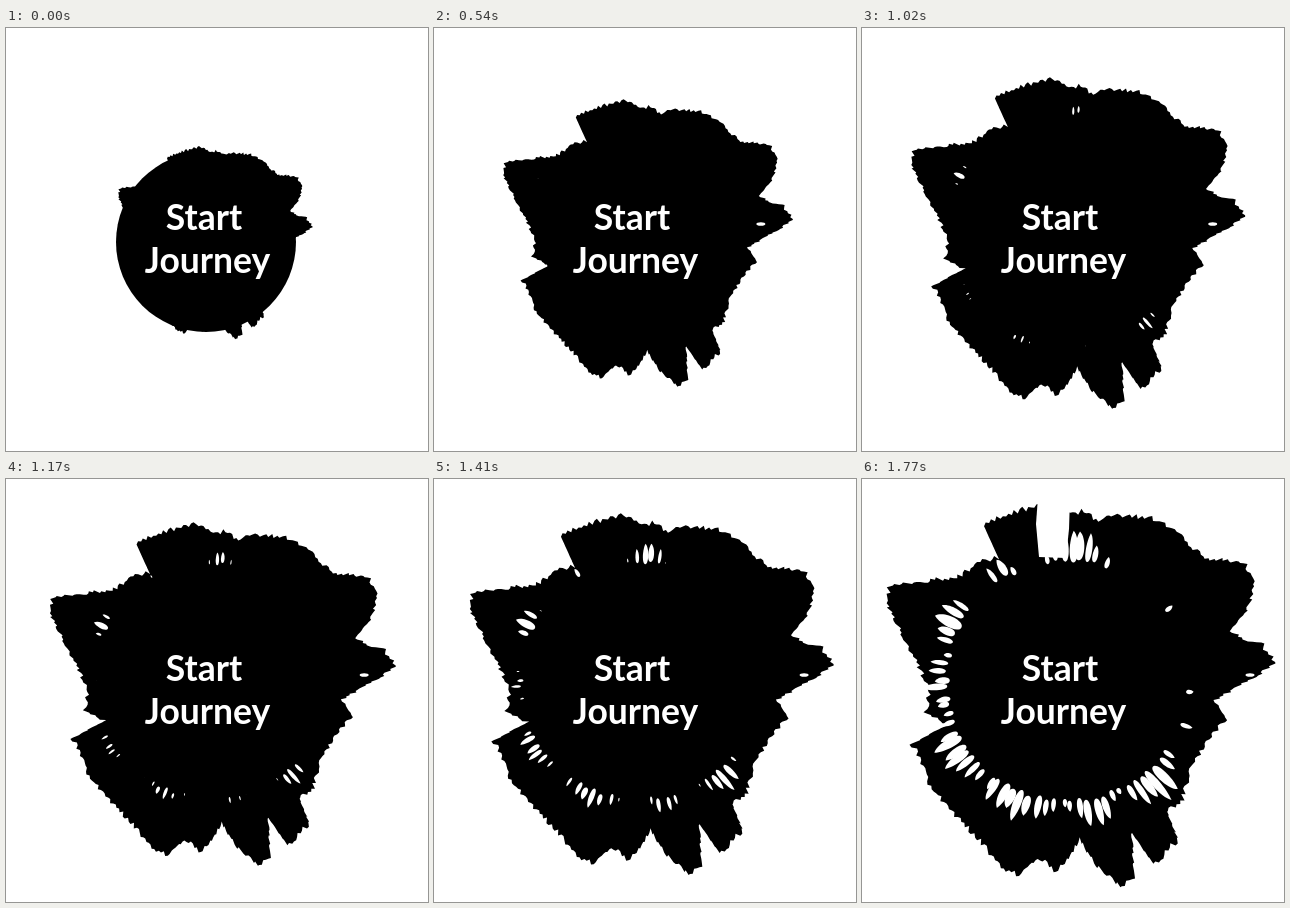
Write an HTML page with a canvas that moves like this. It is 422x423 px and loops after 1800 ms.

```html
<!DOCTYPE html>
<html lang="en">
<head>
<meta charset="utf-8">
<title>Start Journey</title>
<style>
html, body { margin: 0; width: 100%; height: 100%; overflow: hidden; background: #fff; }
canvas, svg { position: absolute; left: 0; top: 0; display: block; }
text { font: bold 35.5px Lato, "Open Sans", sans-serif; fill: #fff; text-anchor: middle; }
</style>
</head>
<body>
<canvas id="ink" width="422" height="423"></canvas>
<svg width="422" height="423">
  <text x="198" y="202">Start</text>
  <text x="201.5" y="245">Journey</text>
</svg>
<script>
const ctx = document.getElementById('ink').getContext('2d');
const LOOP = 1800, STEP = 30, END = 1770, TAU = Math.PI * 2;
const CX = 200, CY = 214;

// Tips and notches of the full-grown blot, clockwise from the top
const lobes = [
  [208, 35], [222, 32], [236, 44], [252, 35], [292, 40], [318, 53], [340, 79], [383, 83],
  [393, 102], [386, 130], [366, 153], [385, 161], [400, 165], [413, 183], [398, 195],
  [353, 221], [366, 239], [350, 255], [328, 290], [320, 323], [304, 330], [316, 360],
  [292, 386], [270, 354], [272, 397], [260, 408], [235, 388], [218, 361], [205, 382],
  [194, 393], [176, 378], [157, 397], [137, 386], [112, 355], [70, 310], [50, 265],
  [86, 245], [64, 233], [68, 213], [56, 186], [24, 124], [28, 107], [100, 97],
  [115, 83], [136, 78], [121, 45], [158, 31], [189, 24]
];

// Where the ink tears open: angle in degrees, spread, strength
const weak = [
  [3, 3, 0.12], [21, 3, 0.12], [49, 10, 0.95], [78, 9, 0.65], [113, 13, 0.85],
  [147, 13, 0.75], [177, 11, 0.5], [208, 7, 1], [240, 4, 0.5], [274, 10, 0.8], [325, 3, 0.12]
];

const clamp = v => Math.max(0, Math.min(1, v));
const mix = (a, b, p) => a + (b - a) * p;
const rand = n => {
  const v = Math.sin(n * 127.1 + 11.7) * 43758.5453;
  return v - Math.floor(v);
};

function buildRim() {
  const rim = [];
  lobes.forEach(([x0, y0], i) => {
    const [x1, y1] = lobes[(i + 1) % lobes.length];
    const cuts = Math.max(1, Math.round(Math.hypot(x1 - x0, y1 - y0) / 3));
    for (let k = 0; k < cuts; k++) {
      const x = mix(x0, x1, k / cuts) - CX, y = mix(y0, y1, k / cuts) - CY;
      rim.push({ a: Math.atan2(y, x), r: Math.hypot(x, y), jag: rand(rim.length) * 2 - 1 });
    }
  });
  return rim;
}

function buildTears() {
  const tears = [];
  for (let deg = 0; deg < 360; deg += 4) {
    const n = deg + 500;
    const power = Math.max(...weak.map(([at, spread, s]) => s * Math.exp(-(((deg - at) / spread) ** 2))));
    if (power < 0.06) continue;
    tears.push({
      a: (deg + rand(n) * 3 - 1.5) * TAU / 360,
      len: 38 * Math.sqrt(power) * mix(0.55, 1.1, rand(n + 0.3)),
      wide: mix(4, 12, power * mix(0.5, 1, rand(n + 0.6))),
      inset: rand(n + 0.8) * 5,
      born: mix(1600, 500, power) + rand(n + 0.9) * 150
    });
  }
  return tears;
}

const rim = buildRim(), tears = buildTears();

function disc(x, y, rx, ry, color) {
  ctx.fillStyle = color;
  ctx.beginPath();
  ctx.ellipse(x, y, rx, ry, 0, 0, TAU);
  ctx.fill();
}

function blot(u) {
  const size = 0.5 + 0.5 * Math.pow(u, 0.6);
  const rough = mix(1.5, 3, u);
  ctx.fillStyle = '#000';
  ctx.beginPath();
  for (const p of rim) {
    const r = p.r * size + p.jag * rough;
    ctx.lineTo(CX + Math.cos(p.a) * r, CY + Math.sin(p.a) * r);
  }
  ctx.fill();
  disc(CX, CY, 90, 90, '#000');
}

// A slit pointing away from the middle, growing outwards
function tear(p, t) {
  const g = clamp((t - p.born) / (END - p.born));
  if (!g) return;
  const inner = mix(109, 117, t / END) + p.inset, len = p.len * g, w = p.wide * g / 2;
  ctx.save();
  ctx.translate(205, 202);
  ctx.rotate(p.a);
  ctx.beginPath();
  ctx.moveTo(inner, 0);
  ctx.bezierCurveTo(inner, -w * 1.3, inner + len * 0.7, -w * 1.3, inner + len, -w * 0.3);
  ctx.bezierCurveTo(inner + len * 0.8, w * 1.3, inner, w * 1.3, inner, 0);
  ctx.fillStyle = '#fff';
  ctx.fill();
  ctx.restore();
}

// The top splits open at the end
function split(t) {
  const g = clamp((t - 1570) / 200);
  if (!g) return;
  ctx.fillStyle = '#fff';
  ctx.beginPath();
  for (const [x, y] of [[177, 78], [174, 45], [176, 18], [208, 18], [207, 50], [204, 79]])
    ctx.lineTo(mix(188, x, g), y);
  ctx.fill();
}

function draw(t) {
  const u = t / END;
  ctx.fillStyle = '#fff';
  ctx.fillRect(0, 0, 422, 423);
  blot(u);
  for (const p of tears) tear(p, t);
  if (t >= 300) disc(300 + 88 * u, 196, 4.5, 1.8, '#fff');
  split(t);
}

const origin = performance.now();
function tick() {
  const t = (performance.now() - origin) % LOOP;
  draw(Math.floor(t / STEP) * STEP);
  requestAnimationFrame(tick);
}
tick();
</script>
</body>
</html>
```
